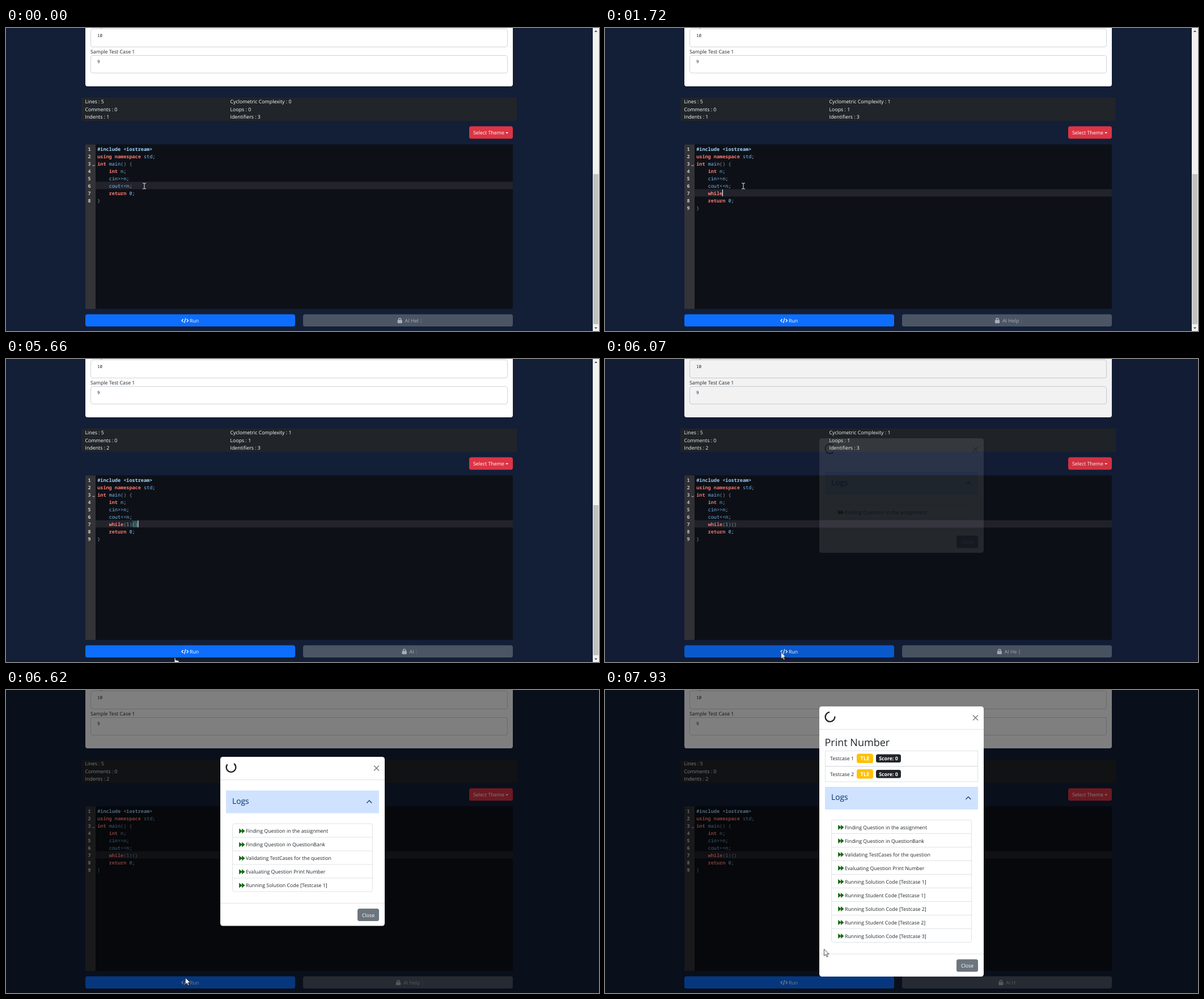
Recreate the animation shown at these times as an HTML page. Size 1046x535 px, loop 8000 ms.

```html
<!DOCTYPE html>
<html lang="en">
<head>
<meta charset="utf-8">
<title>Code runner</title>
<style>
  html, body { margin: 0; width: 100%; height: 100%; overflow: hidden; background: #131e37; }
  svg { display: block; }
  text { font: 8.8px "Open Sans", "Noto Sans", sans-serif; fill: #212529; white-space: pre; text-rendering: geometricPrecision; }
  .light text, text.light { fill: #fff; }
  .mono, .code text { font: 8.52px "Noto Sans Mono", "DejaVu Sans Mono", monospace; }
  .mono { font-size: 7.6px; }
  .code text { fill: #c9d1d9; }
  .code .num { fill: #ccc; text-anchor: middle; font-weight: 600; }
  .meta { fill: #a5d6ff; font-weight: 600; }
  .kw { fill: #ff7b72; font-weight: 600; }
  .var { fill: #79c0ff; }
  .br { fill: #8b949e; }
  .match { fill: #328c82; fill-opacity: .45; }
  .line { fill: none; stroke: #dee2e6; }
  text.bold { font-weight: 700; text-anchor: middle; }
  text.title { font-weight: 500; }

  #bar { animation: blink 1s -.1s infinite; }
  @keyframes blink { 0%, 100% { opacity: 0 } 50% { opacity: 1 } }

  #shade { animation: shade 8s linear infinite; }
  @keyframes shade { 0%, 75.69% { opacity: 0 } 77.56%, 100% { opacity: .5 } }

  #modal { animation: fade 8s linear infinite, slide 8s infinite; }
  @keyframes fade { 0%, 75.69% { opacity: 0 } 77.56%, 100% { opacity: 1 } }
  @keyframes slide {
    0%, 75.69% { transform: translateY(-28.6px); animation-timing-function: ease-out }
    79.44%, 100% { transform: none }
  }

  #mouse { animation: mouse 8s linear infinite; }
  @keyframes mouse {
    0%, 66.5% { transform: translate(244px, 279px) }
    70.75% { transform: translate(297px, 527px) }
    72.5%, 76% { transform: translate(310.5px, 517.5px) }
    82%, 83% { transform: translate(316.5px, 508px) }
    86.5% { transform: translate(332px, 496px) }
    96.6%, 100% { transform: translate(386.5px, 457.5px) }
  }
</style>
</head>
<body>
<svg width="1046" height="535" viewBox="0 0 1046 535">
  <rect width="1046" height="535" fill="#131e37"/>

  <rect x="140" y="-10" width="754" height="113" rx="4" fill="#fff"/>
  <g fill="#fff" stroke="#ced4da">
    <rect x="149.5" y="1.5" width="735" height="32" rx="3.5"/>
    <rect x="149.5" y="48.5" width="735" height="31" rx="3.5"/>
  </g>
  <text x="149" y="-1.5">Sample Test Case 0</text>
  <text x="149" y="45">Sample Test Case 1</text>
  <text x="161" y="15.5" class="mono">10</text>
  <text x="161" y="61.5" class="mono">9</text>

  <rect x="133" y="122.5" width="768" height="41.5" rx="3" fill="#212529"/>
  <g id="stats" class="light"></g>

  <rect x="817" y="173.5" width="77" height="22" rx="3.5" fill="#dc3545"/>
  <text x="824" y="188" class="light">Select Theme</text>
  <path d="M881.2 184h5l-2.5 2.6z" fill="#fff"/>

  <rect x="140" y="205.5" width="754" height="290.5" fill="#0d1117"/>
  <rect x="140" y="205.5" width="18" height="290.5" fill="#333338"/>
  <rect id="active" x="158" width="736" height="13" fill="#22232b"/>
  <g id="pair"></g>
  <g id="code" class="code"></g>
  <path d="M152.6 241.8l2 2.2 2-2.2" fill="none" stroke="#ccc"/>
  <rect id="caret" width="1.2" height="12" fill="#e6e9ee"/>

  <rect id="run" x="140" y="505.5" width="370" height="21.5" rx="3.5"/>
  <path d="M312.6 514l-2.6 2.6 2.6 2.6M318.8 514l2.6 2.6-2.6 2.6M316.8 512.4l-2.2 8.4" fill="none" stroke="#fff" stroke-width="1.3"/>
  <text x="324" y="520" class="light">Run</text>

  <g opacity=".65" class="light">
    <rect x="524" y="505.5" width="370" height="21.5" rx="3.5" fill="#6c757d"/>
    <g id="help">
      <rect y="515.6" width="8.2" height="5.6" rx="1.2" fill="#fff"/>
      <path d="M1.9 516v-1.3a2.2 2.2 0 0 1 4.4 0v1.3" fill="none" stroke="#fff" stroke-width="1.3"/>
      <text id="label" x="13" y="520"></text>
      <rect id="bar" y="513" width="1" height="9" fill="#fff"/>
    </g>
  </g>

  <g id="scroll">
    <rect x="1035" width="11" height="535" fill="#f1f1f1"/>
    <rect x="1036" y="258" width="9" height="265" fill="#c1c1c1"/>
    <path d="M1037.8 7h5.4l-2.7-3zM1037.8 528.5h5.4l-2.7 3z" fill="#505050"/>
  </g>

  <rect id="shade" width="1046" height="535"/>

  <g id="modal">
    <g id="box">
      <rect id="panel" x="378" width="290" rx="4.5" fill="#fff"/>
      <path d="M378 40.5h290" class="line"/>
      <circle id="spin" r="8.4" fill="none" stroke="#212529" stroke-width="2.4" pathLength="8" stroke-dasharray="6 2" stroke-dashoffset="-1"/>
      <path d="M649 15.5l9 9m0-9l-9 9" stroke="#7f7f7f" stroke-width="1.5"/>
      <g id="results">
        <text x="387.5" y="69.5" class="title" style="font-size:18px">Print Number</text>
      </g>
      <g id="logs">
        <rect x="388" width="270" height="40" fill="#cfe2ff"/>
        <text x="399" y="23.3" class="title" style="font-size:13.8px;fill:#052c65">Logs</text>
        <path d="M636.4 22l4.4-4.4 4.4 4.4" fill="none" stroke="#052c65" stroke-width="1.1"/>
        <rect id="list" x="399.5" y="58.5" width="247" rx="3.5" class="line"/>
      </g>
      <g id="foot">
        <path d="M378 .5h290" class="line"/>
        <rect x="620" y="10" width="38" height="22" rx="3.5" fill="#6c757d"/>
        <text x="628" y="24.5" class="light">Close</text>
      </g>
    </g>
  </g>

  <g id="mouse">
    <path id="beam" d="M-3 -5h2l1 .7 1-.7h2M0 -4.3v8.6M-3 5h2l1-.7 1 .7h2" fill="none" stroke="#e8e8e8"/>
    <path id="hand" d="M0 .8q1.2-1.2 2 .2v3.6l4.6 1q1.6.4 1.4 2.2l-.6 4.4-6 .6-4-5q.2-1.4 1.8-.2l.8 1z" fill="#fff" stroke="#111" stroke-width=".9"/>
    <path id="arrow" d="M0 0v12l2.8-2.6 1.9 4.4 2-.9-1.9-4.2h3.8z" fill="#fff" stroke="#111" stroke-width=".8"/>
  </g>
</svg>

<script>
const LOOP = 8000, COL = 5.112, ROW = 13.03, LEFT = 161.2, TOP = 207;
const OPEN = 6055, BLUR = 5950;
const $ = id => document.getElementById(id);
const show = (el, on) => el.style.display = on ? '' : 'none';
const shift = (el, x, y) => el.setAttribute('transform', `translate(${x} ${y})`);
const last = (steps, t) => steps.filter(s => s[0] <= t).pop();

function add(parent, name, attrs, text = '') {
  const el = document.createElementNS('http://www.w3.org/2000/svg', name);
  for (const k in attrs) el.setAttribute(k, attrs[k]);
  el.textContent = text;
  return parent.appendChild(el);
}

// Code editor
const head = ['#include <iostream>', 'using namespace std;', 'int main() {', '    int n;', '    cin>>n;', '    cout<<n;'];
const tail = ['    return 0;', '}'];

// Edited line over time; "|" marks the caret
const edits = [
  [-700, null], [330, '|'], [1030, 'w|'], [1310, 'wh|'], [1380, 'whi|'], [1450, 'whil|'], [1600, 'while|'],
  [1920, 'while(|)'], [2210, 'while(1|)'], [2610, 'while(1`|)'], [3530, 'while(1`|)'], [3600, 'while(1|)'],
  [3880, 'while(1)|'], [4350, 'while(1){|}'], [4420, 'while(1){}|']
];

const rows = Array.from({ length: 9 }, (_, i) => {
  const y = TOP + ROW * i + 9.6;
  return {
    num: add($('code'), 'text', { x: 147, y, class: 'num' }, i + 1),
    text: add($('code'), 'text', { x: LEFT, y })
  };
});
const marks = [0, 1].map(() => add($('pair'), 'rect', { class: 'match', width: COL, height: 11.5 }));

function kind(word) {
  if (word[0] === '#') return 'meta';
  if (/^(using|namespace|int|return|while)$/.test(word)) return 'kw';
  if (/^[(){}]/.test(word)) return 'br';
  return /^[\w<>]/.test(word) ? 'var' : '';
}

function setLine(row, src) {
  if (row.src === src) return;
  row.src = src;
  row.text.textContent = '';
  for (const word of src.match(/#.*|\w+|[(){}]|[<>]+|\s+|./g) || [])
    add(row.text, 'tspan', { class: kind(word) }, word);
}

function findPair(line, at) {
  const close = /[)}]/.test(line[at - 1]) ? at - 1 : /[)}]/.test(line[at] || '') ? at : -1;
  return close < 0 ? null : [line.lastIndexOf(line[close] === ')' ? '(' : '{', close), close];
}

function drawEditor(t) {
  const [time, edit] = last(edits, t);
  const typed = edit !== null;
  const full = typed ? '    ' + edit : head[5] + '|';
  const at = full.indexOf('|'), line = full.replace('|', '');
  const lines = typed ? [...head, line, ...tail] : [...head, ...tail];
  rows.forEach((row, i) => {
    setLine(row, lines[i] || '');
    show(row.num, i < lines.length);
  });
  const y = TOP + ROW * (typed ? 6 : 5);
  $('active').setAttribute('y', y - .6);
  $('caret').setAttribute('x', LEFT + COL * at - .4);
  $('caret').setAttribute('y', y);
  show($('caret'), t < BLUR && (t - time) % 1200 < 600);
  const pair = typed && t < BLUR && findPair(line, at);
  marks.forEach((m, i) => {
    show(m, pair);
    if (!pair) return;
    m.setAttribute('x', LEFT + COL * pair[i]);
    m.setAttribute('y', y + .4);
  });
}

// Statistics
const stats = ['Lines', 'Comments', 'Indents', 'Cyclometric Complexity', 'Loops', 'Identifiers'].map((name, i) => ({
  name, el: add($('stats'), 'text', { x: i < 3 ? 139.5 : 395.5, y: 133 + 13.7 * (i % 3) })
}));

function drawStats(t) {
  const loop = t >= 1700 ? 1 : 0;
  const values = [5, 0, t >= 4400 ? 2 : 1, loop, loop, 3];
  stats.forEach((s, i) => s.el.textContent = `${s.name} : ${values[i]}`);
}

// Self-typing button label: start time, direction
const phases = [[0, -1], [490, 1], [5390, -1], [5870, 1], [7790, -1]];

function drawLabel(t) {
  const [start, dir] = last(phases, t);
  const n = Math.floor((t - start) / 66);
  $('label').textContent = 'AI Help'.slice(0, dir < 0 ? Math.max(1, 6 - n) : Math.min(7, 2 + n));
  const w = $('label').getComputedTextLength();
  shift($('help'), 702.6 - w / 2, 0);
  $('bar').setAttribute('x', 13 + w + 4);
}

// Modal: time, log rows, results
const progress = [
  [0, 1, 0], [6230, 2, 0], [6330, 3, 0], [6430, 4, 0], [6530, 5, 0], [6760, 6, 0],
  [7285, 7, 1], [7400, 8, 1], [7800, 9, 2]
];
const logNames = ['Finding Question in the assignment', 'Finding Question in QuestionBank',
  'Validating TestCases for the question', 'Evaluating Question Print Number'];
for (let i = 0; i < 5; i++)
  logNames.push(`Running ${i % 2 ? 'Student' : 'Solution'} Code [Testcase ${1 + (i >> 1)}]`);

const logs = logNames.map((name, i) => {
  const g = add($('logs'), 'g', { transform: `translate(0 ${58.5 + 24 * i})` });
  if (i) add(g, 'path', { d: 'M399.5 0h247', class: 'line' });
  add(g, 'path', { d: 'M411.5 9l4.8 4-4.8 4zM416.3 9l4.8 4-4.8 4z', fill: '#0b640b', stroke: '#0b640b', 'stroke-width': .6 });
  add(g, 'text', { x: 423, y: 16.2 }, name);
  return g;
});

const results = [1, 2].map(i => {
  const g = add($('results'), 'g', { transform: `translate(0 ${78 + 27.5 * (i - 1)})` });
  add(g, 'rect', { x: 388.5, y: .5, width: 269, height: 27, class: 'line' });
  add(g, 'text', { x: 397, y: 17 }, `Testcase ${i}`);
  add(g, 'rect', { x: 444, y: 5.5, width: 29, height: 16.5, rx: 3.5, fill: '#ffc107' });
  add(g, 'text', { x: 458.5, y: 17.2, class: 'bold light', style: 'font-size:9.3px' }, 'TLE');
  add(g, 'rect', { x: 478, y: 6.5, width: 44, height: 14.5, rx: 3.5, fill: '#212529' });
  add(g, 'text', { x: 500, y: 17, class: 'bold light' }, 'Score: 0');
  return g;
});

function drawModal(t) {
  show($('modal'), t >= OPEN);
  const [, n, k] = last(progress, t);
  const extra = k ? 27.5 * (k + 1) : 0;
  const h = 178.5 + 24 * n + extra;
  shift($('box'), 0, Math.round(267.5 - h / 2));
  $('panel').setAttribute('height', h);
  $('list').setAttribute('height', 24 * n);
  show($('results'), k);
  results.forEach((g, i) => show(g, i < k));
  logs.forEach((g, i) => show(g, i < n));
  shift($('logs'), 0, 59.5 + extra);
  shift($('foot'), 0, h - 40.5);
  const turn = (t - (k ? 7285 : 6070)) / 750 * 360;
  $('spin').setAttribute('transform', `translate(397 18.5) rotate(${turn})`);
}

function drawMouse(t) {
  const shape = t < 5615 ? 'beam' : t >= 5640 && t < OPEN ? 'hand' : 'arrow';
  for (const id of ['beam', 'hand', 'arrow']) show($(id), id === shape);
  $('run').setAttribute('fill', t > 5690 && t < 6120 ? '#0b5ed7' : '#0d6efd');
  show($('scroll'), t < OPEN);
}

function draw(t) {
  for (const part of [drawEditor, drawStats, drawLabel, drawModal, drawMouse]) part(t);
}

let start;
function tick(now) {
  start ??= now;
  draw((now - start) % LOOP);
  requestAnimationFrame(tick);
}
draw(0);
requestAnimationFrame(tick);
</script>
</body>
</html>
```
